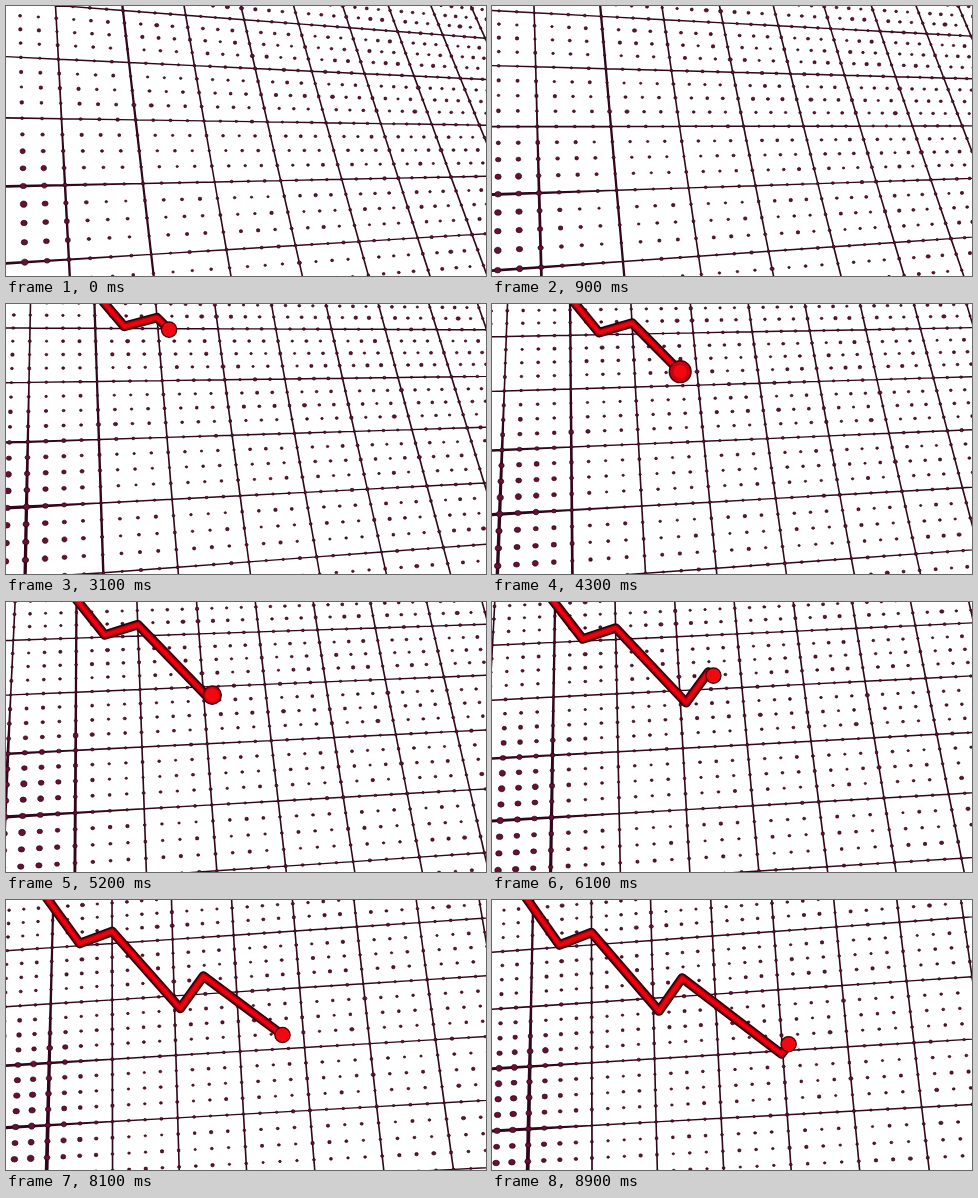
Write an HTML page that moves like this. It is 480 px wide and 270 px high and loops after 9 s.

```html
<!DOCTYPE html>
<html lang="en">
<head>
<meta charset="utf-8">
<title>Falling chart</title>
<style>
  html, body { margin: 0; width: 100%; height: 100%; overflow: hidden; background: #fff; }
  svg { display: block; width: 100vw; height: 100vh; }
</style>
</head>
<body>
<svg viewBox="0 0 480 270" preserveAspectRatio="none">
  <path id="lines" fill="#30061a"/>
  <path id="dots" fill="#651034" stroke="#2c0516" stroke-width=".7"/>
  <g fill="none" stroke-linejoin="round" stroke-linecap="round">
    <path id="edge" stroke="#2b0008" stroke-width="9.6"/>
    <path id="shade" stroke="#a8000e" stroke-width="6.4"/>
    <path id="core" stroke="#f2000e" stroke-width="3.6"/>
  </g>
  <circle id="halo" fill="#c80010" stroke="#4a0008" stroke-width="1.4"/>
  <circle id="tip" r="6.8" fill="#f40810"/>
</svg>
<script>
const LOOP = 9000, STEP = 100;
const el = id => document.getElementById(id);
const f = n => n.toFixed(1);

// Screen position of the grid points (1,1) (6,1) (6,3) (1,3) at a few moments
const knots = [0, 3.1, 6.1, 8.9];
const corners = [
  [[123, 56.5], [91, 77.5], [61.5, 95], [39, 106.6]],
  [[408, 70], [392, 73.5], [373, 79.3], [350, 85.5]],
  [[445, 171], [421, 182], [392, 196], [362, 211]],
  [[137, 177.5], [95, 199], [59.5, 215.5], [36.5, 229]]
];

function cameraWeights(t) {
  return knots.map((a, i) =>
    knots.reduce((w, b, j) => j === i ? w : w * (t - b) / (a - b), 1));
}

function makeProjection(t) {
  const w = cameraWeights(t);
  const [[x0, y0], [x1, y1], [x2, y2], [x3, y3]] = corners.map(track =>
    [0, 1].map(axis => track.reduce((sum, p, i) => sum + p[axis] * w[i], 0)));
  const dx1 = x1 - x2, dx2 = x3 - x2, sx = x0 - x1 + x2 - x3;
  const dy1 = y1 - y2, dy2 = y3 - y2, sy = y0 - y1 + y2 - y3;
  const det = dx1 * dy2 - dx2 * dy1;
  const g = (sx * dy2 - dx2 * sy) / det, h = (dx1 * sy - sx * dy1) / det;
  return (u, v) => {
    const p = (u - 1) / 5, q = (v - 1) / 2, k = 1 + g * p + h * q;
    return [
      (x0 + (x1 - x0 + g * x1) * p + (x3 - x0 + h * x3) * q) / k,
      (y0 + (y1 - y0 + g * y1) * p + (y3 - y0 + h * y3) * q) / k
    ];
  };
}

const smooth = x => { x = Math.max(0, Math.min(1, x)); return x * x * (3 - 2 * x); };
// Ink spreads towards the lower left corner
const ink = (x, y) => smooth((115 - x) / 110) * smooth((y - 85) / 110);

function noise(a, b) {
  const n = Math.sin(a * 127.1 + b * 311.7) * 43758.5453;
  return n - Math.floor(n);
}

const U0 = -2, U1 = 11, V0 = -3, V1 = 6, SUB = 4;

function segment(a, b, base) {
  const len = Math.hypot(b[0] - a[0], b[1] - a[1]);
  const nx = (a[1] - b[1]) / len / 2, ny = (b[0] - a[0]) / len / 2;
  const wa = base + 1.8 * ink(...a), wb = base + 1.8 * ink(...b);
  const pt = (p, w) => f(p[0] + nx * w) + ' ' + f(p[1] + ny * w);
  return `M${pt(a, wa)}L${pt(b, wb)} ${pt(b, -wb)} ${pt(a, -wa)}Z`;
}

function gridLines(project) {
  let d = '';
  for (let u = U0; u <= U1; u++)
    for (let v = V0; v <= V1; v++) {
      const p = project(u, v);
      if (u < U1) d += segment(p, project(u + 1, v), 1.4);
      if (v < V1) d += segment(p, project(u, v + 1), u === 1 ? 2.3 : 1.6);
    }
  return d;
}

function gridDots(project) {
  let d = '';
  for (let i = U0 * SUB; i <= U1 * SUB; i++)
    for (let j = V0 * SUB; j <= V1 * SUB; j++) {
      const [x, y] = project(i / SUB, j / SUB);
      if (x < -5 || x > 485 || y < -5 || y > 275) continue;
      const n = noise(i, j);
      const r = 1 + .35 * n + (n > .97 ? .4 : 0) + 1.5 * ink(x, y);
      const rx = f(r * 1.2), ry = f(r);
      d += `M${f(x - r * 1.2)} ${f(y)}a${rx} ${ry} 0 1 0 ${f(r * 2.4)} 0a${rx} ${ry} 0 1 0 ${f(-r * 2.4)} 0Z`;
    }
  return d;
}

const chart = [
  [.11, -2.14], [1.46, -.04], [2, -.22], [3.09, 1.22],
  [3.48, .69], [4.98, 2.05], [5.5, 1.4]
];
const spans = chart.slice(1).map((p, i) => Math.hypot(p[0] - chart[i][0], p[1] - chart[i][1]));

function chartUpTo(length) {
  const points = [chart[0]];
  for (let i = 0; i < spans.length && length > 0; i++) {
    const k = Math.min(1, length / spans[i]), [a, b] = [chart[i], chart[i + 1]];
    points.push([a[0] + (b[0] - a[0]) * k, a[1] + (b[1] - a[1]) * k]);
    length -= spans[i];
  }
  return points;
}

function draw(ms) {
  const t = ms / 1000, project = makeProjection(t);
  el('lines').setAttribute('d', gridLines(project));
  el('dots').setAttribute('d', gridDots(project));

  const points = chartUpTo(spans[0] - 1.47 + .755 * t).map(p => project(...p));
  const d = 'M' + points.map(p => p.map(f).join(' ')).join('L');
  for (const id of ['edge', 'shade', 'core']) el(id).setAttribute('d', d);

  const [x, y] = points[points.length - 1];
  for (const id of ['halo', 'tip']) {
    el(id).setAttribute('cx', f(x));
    el(id).setAttribute('cy', f(y));
  }
  el('halo').setAttribute('r', f(7 + 6 * Math.sin(Math.PI * t) ** 2));
}

const start = performance.now();
function tick() {
  const ms = (performance.now() - start) % LOOP;
  draw(Math.floor(ms / STEP) * STEP);
  requestAnimationFrame(tick);
}
tick();
</script>
</body>
</html>
```
